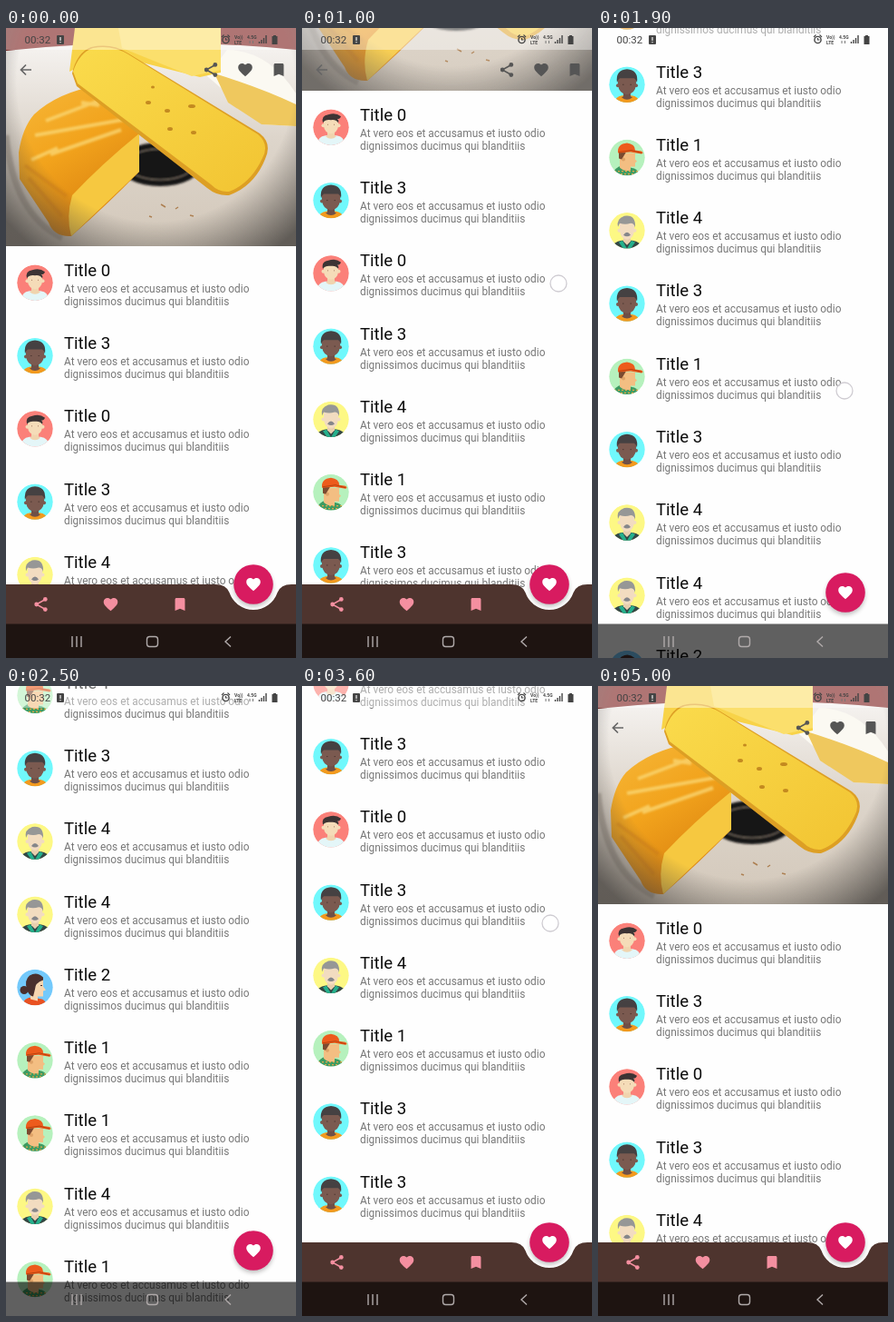
An HTML page that plays this animation: 320 px wide and 693 px high, repeating every 5.1 s.

```html
<!DOCTYPE html>
<html lang="en">
<head>
<meta charset="utf-8">
<title>Scrolling list</title>
<style>
html, body { margin: 0; width: 100%; height: 100%; overflow: hidden; background: #fefefe; }
svg { display: block; width: 320px; height: 693px; font-family: Roboto, sans-serif; }
.title { font-size: 18.6px; fill: #0c0c0c; }
.sub { font-size: 11.86px; fill: #777; }
.status { font-size: 11.5px; fill: #444; }
.tiny { font-size: 5px; font-weight: 700; fill: #444; }
</style>
</head>
<body>
<svg viewBox="0 0 320 693">
<defs>
  <clipPath id="disc"><circle r="19.7"/></clipPath>
  <clipPath id="frame"><path d="M0 0H320V240H0Z"/></clipPath>
  <filter id="soft" x="-50%" y="-50%" width="200%" height="200%"><feGaussianBlur stdDeviation="2.5"/></filter>
  <filter id="blur"><feGaussianBlur stdDeviation="1"/></filter>
  <linearGradient id="plate" x2="0" y2="1">
    <stop offset=".1" stop-color="#f4f1ee"/><stop offset=".5" stop-color="#ddd5cb"/><stop offset="1" stop-color="#d3c8ba"/>
  </linearGradient>
  <radialGradient id="vignette" gradientUnits="userSpaceOnUse" cx="165" cy="60" r="225">
    <stop offset=".68" stop-color="#44413e" stop-opacity="0"/>
    <stop offset="1" stop-color="#44413e" stop-opacity=".8"/>
  </radialGradient>
  <linearGradient id="slab" x1="0" y1="0" x2="1" y2="1">
    <stop offset="0" stop-color="#fadb4c"/><stop offset="1" stop-color="#f2c432"/>
  </linearGradient>
  <linearGradient id="wheel" x1="0" y1="0" x2=".5" y2="1">
    <stop offset="0" stop-color="#f6b83a"/><stop offset=".5" stop-color="#f2a31c"/><stop offset="1" stop-color="#d9800f"/>
  </linearGradient>

  <g id="heart"><path transform="scale(.78)" d="M0 9.35l-1.45-1.32C-6.6 3.36-10 .28-10-3.5-10-6.58-7.58-9-4.5-9c1.74 0 3.41.81 4.5 2.09C1.09-8.19 2.76-9 4.5-9 7.58-9 10-6.58 10-3.5c0 3.78-3.4 6.86-8.55 11.54z"/></g>
  <g id="mark"><path transform="scale(.78)" d="M5-9H-5c-1.1 0-2 .9-2 2V9l7-3 7 3V-7c0-1.1-.9-2-2-2z"/></g>
  <g id="share">
    <path d="M5-5.5L-5 0 5 5.5" fill="none" stroke="currentColor" stroke-width="1.5"/>
    <circle cx="4.8" cy="-5.6" r="2.4"/><circle cx="-4.8" r="2.4"/><circle cx="4.8" cy="5.6" r="2.4"/>
  </g>

  <g id="face0" clip-path="url(#disc)">
    <circle r="20" fill="#fb8079"/>
    <path d="M-16 20Q-15 10-6 9H6Q15 10 16 20Z" fill="#e4f6f8"/>
    <path d="M-4 2H4V9L6 10Q0 15-6 10L-4 9Z" fill="#f0d4ae"/>
    <path d="M-8-10H8V-1Q7 6 0 7Q-7 6-8-1Z" fill="#f5dcb8"/>
    <circle cx="-8.5" cy="-2" r="2" fill="#f5dcb8"/><circle cx="8.5" cy="-2" r="2" fill="#f5dcb8"/>
    <path d="M-9-5Q-11-13-3-14Q5-17 11-12Q10-9 7-9Q9-8 8-5Q5-9 0-8Q-6-9-9-5Z" fill="#3d3434"/>
    <path d="M-4-3h1M3-3h1" stroke="#a97e64"/>
  </g>
  <g id="face1" clip-path="url(#disc)">
    <circle r="20" fill="#b6f1bd"/>
    <path d="M-16 20Q-14 10-5 9L8 12Q13 14 14 20Z" fill="#3d9b62"/>
    <path d="M-14 15H14M-11 18H14" stroke="#e1a64b" stroke-width="1.3" stroke-dasharray="2 2"/>
    <path d="M-8-5H9V2L11 4 9 6V10H4V14Q-3 16-8 11Z" fill="#f3be82"/>
    <circle cx="-4" cy="2" r="2" fill="#dea267"/>
    <path d="M-9 1V-6H-1L-4-1-6 2Z" fill="#7b4a30"/>
    <path d="M-10-5Q-11-15 0-16Q9-15 9-8L16-7Q19-5 16-4L4-6Z" fill="#ed5b1c"/>
    <path d="M-9-6L5-8 16-5" fill="none" stroke="#b9410d"/>
  </g>
  <g id="face2" clip-path="url(#disc)">
    <circle r="20" fill="#73c9fb"/>
    <path d="M-15 20Q-12 11-3 11L8 13Q12 15 13 20Z" fill="#e95121"/>
    <path d="M-5-10H9V-1L12 3 9 4V10H3V15L-5 13Z" fill="#f6d5b0"/>
    <path d="M9-11Q2-18-6-13Q-12-8-9 2Q-7 9-2 10L0 2Q0-5 9-8Z" fill="#4a302e"/>
    <circle cx="-12" cy="3" r="4.5" fill="#4a302e"/>
    <path d="M6-2h2" stroke="#4a302e"/>
  </g>
  <g id="face3" clip-path="url(#disc)">
    <circle r="20" fill="#70f8fc"/>
    <path d="M-14 20Q-13 13-5 12H5Q13 13 14 20Z" fill="#f39a1e"/>
    <path d="M-4 5H4V13L6 14Q0 19-6 14L-4 13Z" fill="#6f5047"/>
    <path d="M-10-9H10V0Q9 10 0 11Q-9 10-10 0Z" fill="#7b5a50"/>
    <circle cx="-10" cy="1" r="2" fill="#7b5a50"/><circle cx="10" cy="1" r="2" fill="#7b5a50"/>
    <path d="M-11-2Q-13-16 0-17Q13-16 11-2Q10-6 8-7H-8Q-10-6-11-2Z" fill="#454142"/>
    <path d="M-5 0h1.500M3.500 0h1.500" stroke="#4b3731"/>
  </g>
  <g id="face4" clip-path="url(#disc)">
    <circle r="20" fill="#fdf884"/>
    <path d="M-17 20Q-15 12-6 11H6Q15 12 17 20Z" fill="#334746"/>
    <path d="M-5 11L0 20 5 11 9 13 4 20H-4L-9 13Z" fill="#25b08c"/>
    <path d="M-4 4H4V12L0 16-4 12Z" fill="#e8cfae"/>
    <path d="M-8-12H8V0Q7 9 0 10Q-7 9-8 0Z" fill="#f2dcc0"/>
    <circle cx="-8.5" r="2" fill="#f2dcc0"/><circle cx="8.5" r="2" fill="#f2dcc0"/>
    <path d="M-10-4Q-12-13-3-16Q10-18 9-3Q8-8 4-8Q-2-6-8-8Z" fill="#969796"/>
    <path d="M-4 5Q0-1 4 5Q0 8-4 5Z" fill="#85868a"/>
  </g>
</defs>

<rect width="320" height="693" fill="#fefefe"/>
<path id="glow" d="M0 240H320V246Q160 278 0 246Z" fill="#ebe4fb"/>
<g id="list"></g>

<g id="header" clip-path="url(#frame)">
  <rect width="320" height="240" fill="url(#plate)"/>
  <path d="M0 0H320V24Q160 8 0 25Z" fill="#7a1a18"/>
  <g filter="url(#blur)">
    <ellipse cx="170" cy="150" rx="46" ry="24" fill="#191615"/>
    <ellipse cx="170" cy="150" rx="37" ry="17" fill="none" stroke="#8c8173"/>
    <path d="M0 118Q8 205 62 231" fill="none" stroke="#9d9388" stroke-width="7" opacity=".6"/>
  </g>
  <path d="M222 53L244 24Q290 25 320 72V108L284 106Z" fill="#fbf9f2"/>
  <path d="M230 50Q282 66 320 84V108L282 106 245 82Z" fill="#efc85e"/>
  <path d="M76 0H237V49L214 54 110 28 70 48Z" fill="#f8d348"/>
  <path d="M124 0H237V46L205 53 128 22Z" fill="#fbdf6c"/>
  <path d="M14 137Q18 110 31 95Q58 70 104 63Q125 61 132 70L147 113 147 158Q113 193 72 229Q53 230 47 214L15 166Z" fill="url(#wheel)"/>
  <path d="M147 116V158L72 229Q66 208 73 184Q105 150 147 116Z" fill="#f6c840"/>
  <path d="M44 102L115 75M32 118L140 99M49 139L127 112M28 145L57 132M83 82L103 85" stroke="#fbdc7c" stroke-width="4" opacity=".7" filter="url(#blur)"/>
  <path d="M21 151L67 185M25 165L62 207" stroke="#c87412" stroke-width="4" opacity=".35" filter="url(#blur)"/>
  <path d="M73 50Q78 27 94 21Q117 16 135 28L280 116Q294 127 286 144Q274 174 246 184Q233 185 222 176L78 64Z" fill="#dd9f24"/>
  <path d="M74 48Q81 27 96 22Q117 18 135 29L278 117Q291 128 283 143Q270 171 246 180Q235 181 226 172L79 61Z" fill="url(#slab)"/>
  <g fill="#c48a20">
    <ellipse cx="157" cy="82" rx="3" ry="2"/><ellipse cx="178" cy="91" rx="3" ry="2"/>
    <ellipse cx="205" cy="86" rx="4" ry="2"/><ellipse cx="181" cy="111" rx="3" ry="2"/>
    <ellipse cx="207" cy="115" rx="3" ry="2"/><ellipse cx="162" cy="65" rx="2" ry="1.5"/>
  </g>
  <path d="M171 194l5 3M187 199l3-2M203 206l4 1M158 207l3 1" stroke="#ad8052" stroke-width="1.5"/>
  <rect width="320" height="240" fill="url(#vignette)"/>
  <rect id="scrim" width="320" height="240" fill="#fff"/>
</g>

<g id="toolbar" fill="#555" color="#555">
  <path d="M28 46H17M22 40.5L16.5 46 22 51.5" fill="none" stroke="#666" stroke-width="1.7"/>
  <use href="#share" x="226" y="46"/><use href="#heart" x="264" y="46"/><use href="#mark" x="301" y="46"/>
</g>

<rect width="320" height="24" fill="#fff" opacity=".4"/>
<text class="status" x="20.5" y="17">00:32</text>
<g fill="#444">
  <rect x="56" y="8" width="8" height="10" rx="1"/>
  <path d="M60 10v4M60 15v1.2" stroke="#eee" stroke-width="1.2"/>
  <circle cx="242.5" cy="13" r="3.6" fill="none" stroke="#444" stroke-width="1.4"/>
  <path d="M238 10l2.5-2.5M247 10l-2.5-2.5M242.5 11v2h2" fill="none" stroke="#444" stroke-width="1.1"/>
  <text class="tiny" x="252" y="12">Vo))</text><text class="tiny" x="252" y="17.5">LTE</text>
  <text class="tiny" x="266" y="12">4.5G</text>
  <path d="M269 17v-3M272.5 14v3" stroke="#777"/>
  <path d="M279.5 17v-2M282 17v-4M284.5 17v-6M287 17V8" stroke="#444" stroke-width="1.4"/>
  <path d="M293.5 9H295V8h3v1h1.5V18h-6Z"/>
</g>

<g id="bar">
  <path d="M0 612H231Q243 612 246.5 621A28 28 0 0 0 299.5 621Q303 612 315 612H320V693H0Z" fill="#4e342e"/>
  <g fill="#f48fa0" color="#f48fa0">
    <use href="#share" x="38.5" y="634"/><use href="#heart" x="115.5" y="634"/><use href="#mark" x="192" y="634"/>
  </g>
</g>
<g id="fab">
  <circle cx="273" cy="3" r="21.5" opacity=".25" filter="url(#soft)"/>
  <circle cx="273" r="21.8" fill="#d81b60"/>
  <use href="#heart" x="273" fill="#fff"/>
</g>

<rect y="655.5" width="320" height="37.5" opacity=".62"/>
<g fill="none" stroke="#b0aaaa" stroke-width="1.4">
  <path d="M73 669v12M78 669v12M83 669v12M248 669.5l-6 5.5 6 5.5"/>
  <rect x="155.5" y="669.5" width="12" height="11" rx="3"/>
</g>
<circle id="touch" r="9" fill="#fff" fill-opacity=".55" stroke="#cfccd2" stroke-width="1.3"/>
</svg>

<script>
const LOOP = 5100, STEP = 100, PITCH = 80.28;
const people = "03034133143134421141324";

// time, scroll offset
const scrollKeys = [
  [600, 0], [700, 20], [800, 65], [900, 115], [1000, 171], [1200, 325], [1400, 440],
  [1600, 515], [1700, 580], [1900, 780], [2000, 880], [2300, 1070], [2500, 1153],
  [2700, 1190], [2900, 1200], [3000, 1130], [3200, 840], [3400, 450], [3500, 340],
  [3600, 283], [3700, 230], [3800, 110], [3900, 20], [4000, 0]
];
// start, end, x, finger y plus scroll
const drags = [[600, 1100, 283, 452], [1700, 2000, 272, 1179], [2900, 3200, 274, 1450], [3600, 3900, 274, 544]];

const $ = id => document.getElementById(id);
const clamp = v => Math.max(0, Math.min(1, v));
const ramp = (t, from, to) => clamp((t - from) / (to - from));
const ease = v => v * v * (3 - 2 * v);
const shift = (id, y) => $(id).setAttribute("transform", `translate(0 ${y})`);

function track(keys, t) {
  const i = keys.findIndex(k => k[0] > t);
  if (i === 0) return keys[0][1];
  if (i < 0) return keys[keys.length - 1][1];
  const [t0, a] = keys[i - 1], [t1, b] = keys[i];
  return a + (b - a) * ramp(t, t0, t1);
}

$("list").innerHTML = [...people].map((p, i) => `
  <g transform="translate(0 ${240 + i * PITCH})">
    <use href="#face${p}" x="32" y="40.3"/>
    <text class="title" x="64" y="32.7">Title ${p}</text>
    <text class="sub" x="64" y="50.7">At vero eos et accusamus et iusto odio</text>
    <text class="sub" x="64" y="64.7">dignissimos ducimus qui blanditiis</text>
  </g>`).join("");

function draw(t) {
  const s = track(scrollKeys, t);
  shift("list", -s);
  shift("header", -s);
  shift("toolbar", Math.min(0, 172 - s));

  const hidden = ease(ramp(t, 1150, 1400)) - ease(ramp(t, 2950, 3200));
  shift("bar", 90 * hidden);
  shift("fab", 612 + 9 * hidden);

  $("scrim").setAttribute("opacity", ramp(t, 950, 1450) - ramp(t, 3900, 4500));
  $("glow").setAttribute("opacity", t < 3950 ? 0 : 1 - ramp(t, 4200, 4600));

  const drag = drags.find(d => t >= d[0] && t <= d[1]);
  $("touch").setAttribute("visibility", drag ? "visible" : "hidden");
  if (drag) $("touch").setAttribute("transform", `translate(${drag[2]} ${drag[3] - s})`);
}

const start = performance.now();
function tick() {
  const t = (performance.now() - start) % LOOP;
  draw(Math.floor(t / STEP) * STEP);
  requestAnimationFrame(tick);
}
draw(0);
requestAnimationFrame(tick);
</script>
</body>
</html>
```
